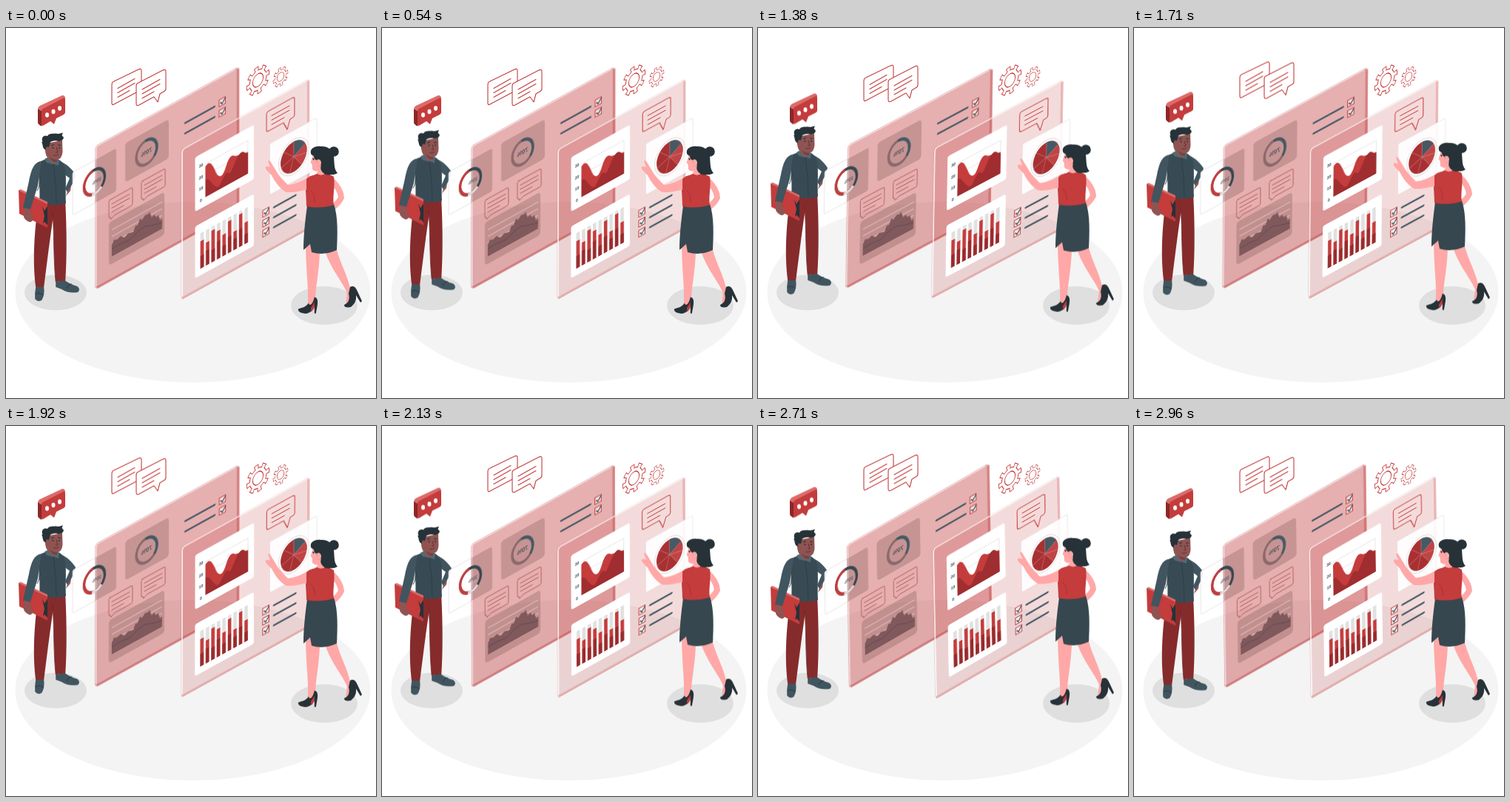
These frames come from a looping animation (500x500 px, 3000 ms). An HTML page without scripts:

```html
<!DOCTYPE html>
<html lang="en">
<head>
<meta charset="utf-8">
<title>Team dashboard</title>
<style>
html, body { margin: 0; width: 100%; height: 100%; overflow: hidden; background: #fff; }
svg { display: block; width: 100%; height: 100%; }
text { font-family: "Liberation Sans", Inter, sans-serif; }

.sway { --a: 1deg; animation: sway 3s linear infinite; }
.back { transform-origin: 202px 203px; }
.front { --a: 1.2deg; transform-origin: 328px 218px; }
.float { animation: float 3s linear infinite; }
.rise { --h: -10px; animation: rise 3s linear infinite; }
.high { --h: -20px; }

@keyframes float { 50% { transform: translateY(-10px); } }
@keyframes rise {
  0%, 33.333% { transform: none; }
  83.333% { transform: translateY(var(--h)); }
  100% { transform: translateY(calc(var(--h) * .667)); }
}
@keyframes sway {
  0%, 16.667% { transform: rotate(0deg); }
  41.667% { transform: rotate(var(--a)); }
  91.667% { transform: rotate(calc(var(--a) * -1)); }
  100% { transform: rotate(calc(var(--a) * -.667)); }
}

.red { fill: #c43c3c; }
.deep { fill: #a02d2f; }
.line { fill: none; stroke: #c43c3c; stroke-linejoin: round; stroke-linecap: round; }
.ink { fill: none; stroke: #455a64; stroke-linecap: round; }
.skin { fill: #ffa8a7; }
.tan { fill: #8f5452; }
.shirt { fill: #40555f; }
.dark { fill: #263238; }
.shade { fill: #6b4346; fill-opacity: .25; }
.glass { fill: #c0373a; }
</style>
</head>
<body>
<svg viewBox="0 0 500 500">
  <defs>
    <g id="box">
      <rect width="8.5" height="9" fill="#fff" fill-opacity=".55" stroke="#c43c3c"/>
      <path class="ink" d="M2 4.5L4 7L8.5 1" stroke="#263238" stroke-width="1.4"/>
    </g>
    <g id="gear">
      <g fill="none" transform="rotate(-20)">
        <circle r="15.3" stroke="#c43c3c" stroke-width="5.6" pathLength="80" stroke-dasharray="5.2 4.8"/>
        <circle r="13.6" fill="#c43c3c"/>
        <circle r="14.4" stroke="#fff" stroke-width="5.4" pathLength="80" stroke-dasharray="3.6 6.4" stroke-dashoffset="-.8"/>
      </g>
      <circle r="12.6" fill="#fff"/>
      <circle r="8.2" fill="none" stroke="#c43c3c" stroke-width="1.1"/>
    </g>
    <rect id="bar" width="4.6" height="48" y="-48" fill="#e0e0e0"/>
  </defs>

  <ellipse cx="252.500" cy="357" rx="240" ry="122" fill="#f4f4f4"/>
  <ellipse cx="67" cy="357.500" rx="42" ry="24" fill="#dfdfdf"/>
  <ellipse cx="430" cy="375" rx="45" ry="26" fill="#dfdfdf"/>

  <!-- chat outlines -->
  <g class="rise high">
    <g class="line" stroke-width="1.100">
      <path d="M146 72L179 56Q183 54 183 58V81Q183 84 180 85L146 103Q143 105 143 101V77Q143 73 146 72Z" fill="#fff"/>
      <path d="M151 81.500L174 68.500M151 87.500L174 74.500M151 93.500L167 84.500"/>
      <path d="M179 74L212 57Q216 55 216 59V82Q216 85 213 86L208 89L205 100L200 93L180 104Q176 106 176 102V78Q176 75 179 74Z" fill="#fff"/>
      <path d="M184 83L208 69.500M184 89L208 75.500M184 95L200 86"/>
    </g>
  </g>

  <use href="#gear" transform="matrix(.87 -.5 0 1.04 340.500 70.500)"/>
  <use href="#gear" transform="matrix(.57 -.32 0 .7 371 66)"/>

  <!-- man -->
  <g class="float">
    <path class="shirt" d="M73 180C83 184 90 192 94 198Q92 209 83 222L80 217L86 203L78 197Z"/>
    <path class="tan" d="M83 221L88 213L87 220L81 227Z"/>
    <g transform="translate(-.8 0)">
      <g fill="#852b2c">
        <path d="M45 234L67 240C62 270 57 310 52 350L41 350C37 320 38 280 45 234Z"/>
        <path d="M59 236L81 235C83 275 83 310 81 342L68 343C65 310 66 280 64 250Z"/>
      </g>
      <path d="M64 250C66 285 65 315 68 343" fill="none" stroke="#6e2325" stroke-width=".8"/>
      <path class="shirt" d="M41 350L52 350Q53.500 361 49 368Q43 371 40 366Q39.500 358 41 350Z"/>
      <path class="shirt" d="M68 343L80 341Q89 347 97 349Q102 353 98 357Q85 359 76 353L68 350Z"/>
      <path d="M41 360Q46 356 51 361M83 352Q85 346 90 346" fill="none" stroke="#263238" stroke-width=".8"/>
    </g>
    <path d="M47 180L57 176L70 177Q78 181 80 190C82 205 80 222 81 237Q62 242 45 236C47 215 42 195 47 180Z" fill="#384b55"/>
    <path d="M64 184Q68 210 68 238M45 200Q46 215 42 220" fill="none" stroke="#2c3d46" stroke-width=".9"/>
    <path class="tan" d="M53 156Q52 171 56 175L58 181Q64 187 69 181V178Q76 177 76.500 167L76 152Z"/>
    <path d="M56 175L64 184L55 182L52 177ZM69 178L72 178L71 186L65 184Z" fill="#516a76"/>
    <path d="M69 178Q63 178 59 174Q62 182 69 181Z" fill="#74413f"/>
    <path class="dark" d="M51 163C49 159 50 157 48 154L49.500 154C47 148 51 144 56 146C58 142 64 143 66 142.500L71 143L77 141.500L75.500 145L78 148Q77 153 71 153Q65 151 60 154L58 161Q53 159 54 165Z"/>
    <path d="M61 159L65 157.500M70 158L74 158.500" fill="none" stroke="#263238" stroke-width="1.200"/>
    <circle class="dark" cx="63.500" cy="162" r="1"/><circle class="dark" cx="72" cy="162" r="1"/>
    <path d="M68 161L70 168L67 168M64 172Q68 173 71 171" fill="none" stroke="#5c2f2d" stroke-width=".9"/>
    <path class="red" d="M17 219L56 237V270L18 251Z"/>
    <path d="M17 219L20 218L56 235V238Z" fill="#dc6b69"/>
    <path class="dark" d="M49 241L52 247L56 241V266L52 262L50 264L52 254Z"/>
    <path class="shirt" d="M48 180C37 181 34 193 31 207L23 243Q28 248 33 245L43 213Z"/>
    <path class="tan" d="M24 243L33 245Q33 252 37 257Q36 263 31 262Q25 259 24 255Z"/>
  </g>

  <g class="rise">
    <path d="M43 109L48 112V133L44 130Q43 129 43 127Z" fill="#8b2729"/>
    <path d="M43 109Q44 106 46 105L76 91Q80 91 80 95L50 110L48 112Z" fill="#dc6b69"/>
    <path class="red" d="M50 109L77 95Q80 93 80 97V114Q80 116 78 117L68 122L65 130L60 126L50 132Q48 133 48 130V112Q48 110 50 109Z"/>
    <g fill="#fff">
      <ellipse cx="55.500" cy="117.500" rx="2.500" ry="3.200"/>
      <ellipse cx="64" cy="113" rx="2.500" ry="3.200"/>
      <ellipse cx="72.500" cy="108.500" rx="2.500" ry="3.200"/>
    </g>
  </g>

  <!-- rear screen -->
  <g class="sway back">
    <g transform="translate(121 160) skewY(-29)">
      <path d="M-31 20Q-31 18 -29 18H0V76H-29Q-31 76 -31 74Z" fill="#fff" fill-opacity=".92" stroke="#e0e0e0" stroke-width=".8"/>
      <rect class="glass" x="-.7" y="-1" width="194.700" height="194.500" rx="5" fill-opacity=".4"/>
      <path d="M2 191.800H187Q192.500 191.800 192.500 186V2" fill="none" stroke="#b8383b" stroke-opacity=".38" stroke-width="3.600"/>
      <path d="M.8 189V5Q.8 .5 5 .5H189" fill="none" stroke="#fff" stroke-opacity=".65" stroke-width="1.400"/>
      <path class="shade" d="M0 18H25Q28 18 28 21V73Q28 76 25 76H0Z"/>
      <rect class="shade" x="40" y="18" width="59" height="53" rx="4"/>
      <rect class="shade" x="18" y="113" width="75" height="58" rx="4"/>

      <g transform="translate(-1.500 47) scale(.87 1)" fill="none" stroke-width="4">
        <circle r="16" stroke="#37474f"/>
        <path d="M-4 15.500A16 16 0 0 1 -2 -15.900" stroke="#c43c3c"/>
        <path d="M-4 15.500A16 16 0 0 0 11 11.600" stroke="#e3d8d8"/>
        <text transform="translate(4 0) scale(-1 1)" y="3" text-anchor="middle" font-size="7" font-weight="bold" fill="#5d666c" stroke="none">30%</text>
      </g>
      <g transform="translate(69 46) scale(.87 1)" fill="none" stroke-width="4">
        <circle r="16" stroke="#8a6a6c"/>
        <path d="M-2 -15.900A16 16 0 0 1 12 10.600" stroke="#455a64"/>
        <text transform="scale(-1 1)" y="3" text-anchor="middle" font-size="8.500" font-weight="bold" fill="#55555c" stroke="none">70%</text>
      </g>

      <g class="line" stroke="#a8474a" style="stroke:#a8474a" stroke-width=".75">
        <path d="M20 83H48Q50 83 50 85V105Q50 107 48 107H26L21 110L20 107Q18 107 18 105V85Q18 83 20 83Z"/>
        <path d="M22 90H46M22 95.500H46M22 101H38"/>
        <path d="M64 82H92Q94 82 94 84V104Q94 106 92 106H70L65 109L64 106Q62 106 62 104V84Q62 82 64 82Z"/>
        <path d="M66 89H90M66 94.500H90M66 100H82"/>
      </g>
      <path d="M22 125H90M22 134H90M22 143H90" stroke="#e9cccd" stroke-width=".8"/>
      <path d="M22 161V145L25 140L29 142L34 140L39 145L44 142L51 144L54 137L57 138L60 131L63 134L67 130L71 131L73 129L76 138L79 136L82 141L85 140L87 148L90 147V161Z" fill="#80595c"/>
      <path d="M22 151L34 150L46 152L57 147L67 145L76 149L90 153" fill="none" stroke="#5a454a" stroke-width=".7"/>
      <path class="ink" d="M121 35.500H161M121 49.500H161" stroke-width="2.300"/>
      <use href="#box" x="167" y="30"/><use href="#box" x="167" y="44"/>
    </g>
  </g>

  <!-- near screen -->
  <g class="sway front">
    <g transform="translate(238 163) skewY(-29)">
      <rect class="glass" x="-1.700" width="173.700" height="204" rx="5" fill-opacity=".18"/>
      <path d="M0 202.300H165Q170.500 202.300 170.500 197V3" fill="none" stroke="#c43c3c" stroke-opacity=".24" stroke-width="3.400"/>
      <path d="M0 200V6Q0 1.300 4.500 1.300H168" fill="none" stroke="#fff" stroke-opacity=".75" stroke-width="1.800"/>
      <rect x="17.500" y="21.500" width="79.500" height="73.500" rx="3" fill="#fff"/>
      <rect x="17.500" y="115" width="79.500" height="70" rx="3" fill="#fff"/>

      <path d="M31.500 38H89M31.500 53H89M31.500 68H89M31.500 83H89M31.500 38V83M89 38V83" fill="none" stroke="#dcdcdc" stroke-width=".7"/>
      <g font-size="5" font-weight="bold" fill="#37474f" text-anchor="middle">
        <text x="25.500" y="39">30</text><text x="25.500" y="55">20</text><text x="25.500" y="70">10</text><text x="25.500" y="86">0</text>
      </g>
      <path class="red" d="M31.500 42C35 37 39 39 43 50S49 66 53 66S59 56 62 51S68 46 72 50L89 54V83H31.500Z"/>
      <path class="deep" d="M31.500 60C36 58 40 70 45 76S51 77 56 70S61 67 64 69S72 53 78 50S84 55 89 55V83H31.500Z"/>

      <g transform="translate(24.700 176)">
        <use href="#bar"/><use href="#bar" x="7.450"/><use href="#bar" x="14.900"/><use href="#bar" x="22.350"/><use href="#bar" x="29.800"/><use href="#bar" x="37.250"/><use href="#bar" x="44.700"/><use href="#bar" x="52.150"/><use href="#bar" x="59.600"/>
        <g fill="none" stroke-width="4.600">
          <path stroke="#c43c3c" d="M2.300 0v-37M9.750 0v-31M17.200 0v-43M24.650 0v-38M32.100 0v-29M39.550 0v-43M47 0v-25M54.450 0v-44M61.900 0v-29"/>
          <path stroke="#982b2d" d="M2.300 0v-17M9.750 0v-20M17.200 0v-17M24.650 0v-24M32.100 0v-14M39.550 0v-22M47 0v-15M54.450 0v-24M61.900 0v-13"/>
        </g>
      </g>

      <use href="#box" x="109" y="144"/><use href="#box" x="109" y="157.500"/><use href="#box" x="109" y="171"/>
      <path class="ink" d="M124 148H153.500M124 161.500H153.500M124 175H153.500" stroke-width="2.300"/>

      <g class="line" stroke-width="1">
        <path d="M117 14H149Q152 14 152 17V38Q152 41 149 41H146L142 53L137 41H117Q114 41 114 38V17Q114 14 117 14Z"/>
        <path d="M121 22.500H145M121 28.500H145M121 34.500H138"/>
      </g>

      <rect x="118.500" y="59" width="63.500" height="69" rx="2" fill="#fff" fill-opacity=".9" stroke="#e6dede" stroke-width=".7"/>
      <g transform="translate(150.800 94.500) scale(.87 1)">
        <circle r="23.300" fill="#fff" stroke="#c9c9c9" stroke-width=".7"/>
        <circle r="20.500" fill="#a83032"/>
        <path d="M0 0L0 -20.500A20.500 20.500 0 0 1 17.500 -9Z" fill="#455a64"/>
        <path d="M0 0L17.500 -9A20.500 20.500 0 0 1 12.500 16Z" fill="#c04446"/>
        <path d="M0 0V-20M0 0L17 -9M0 0L12 16M0 0L-6 19M0 0L-19 6M0 0L-15 -13M0 0L19.500 4" stroke="#dca0a0" stroke-width=".5"/>
      </g>
    </g>
  </g>

  <!-- woman -->
  <g class="rise">
    <path d="M440 206Q452 217 453 229Q450 236 442 242" fill="none" stroke="#ffa8a7" stroke-width="8" stroke-linecap="round" stroke-linejoin="round"/>
    <path class="skin" d="M430 298L446 296C451 317 462 335 465 352L464 370L459 374L461 358C455 343 438 325 430 298Z"/>
    <path class="skin" d="M405 290L424 298C424 325 419 345 418 364L414 379L401 381L408 372C409 350 405 325 405 290Z"/>
    <g transform="translate(.8 .8)">
      <path class="dark" d="M394 379C400 377 405 376 408 371C410 376 414 372 416 363C420 363 421 368 420 374L418 385H416V376C412 384 406 387 398 384Q394 383 394 379Z"/>
      <path class="red" d="M411 378L416 370V377L412 383Z"/>
    </g>
    <path class="dark" d="M457 374C463 372 465 366 463 359L465 350C470 347 473 351 475 356L481 369L479 371L473 361C474 369 470 374 466 377C461 378 457 378 457 374Z"/>
    <path d="M407 240L443 238C449 255 448 280 447 300Q430 308 413 303L411 292L402 300C402 282 404 262 407 240Z" fill="#37474f"/>
    <path class="skin" d="M415 169L413.500 176L411.500 182L413.500 184L414 191Q418 195 421 193L419 200L431 204L434 195L430 173Z"/>
    <path class="red" d="M411 201C415 199 418 198 420 197Q427 201 432 196Q439 198 443 201C445 215 441 228 443 239Q424 245 406 241C406 228 404 214 405 206Z"/>
    <circle class="dark" cx="443" cy="167" r="6.800"/>
    <path class="dark" d="M412.500 171C409 163 418 159 425 160C435 159 442 165 443 174C444 184 443 191 448 196Q443 199 439 198Q432 200 427 194Q424 190 426 185L422 187L420 179Q416 177 416 173Z"/>
    <path class="skin" d="M420 178Q425 176 426 182Q426 187 421 187Z"/>
    <path class="dark" d="M414 176L417 176.500L415.500 179Z"/>
    <path class="skin" d="M411 200C401 207 391 211 381 212C375 206 368 199 365 193L357 180Q355 178 354 180L357 188L352 187Q349 189 353 193L359 199C364 209 372 219 379 222C393 223 405 217 415 218Q419 208 411 200Z"/>
    <path class="red" d="M406 204Q411 199 417 199L420 214Q412 222 406 219Z"/>
    <path d="M412 220Q418 226 417 236" fill="none" stroke="#a02d2f" stroke-width=".7"/>
  </g>
</svg>
</body>
</html>
```
